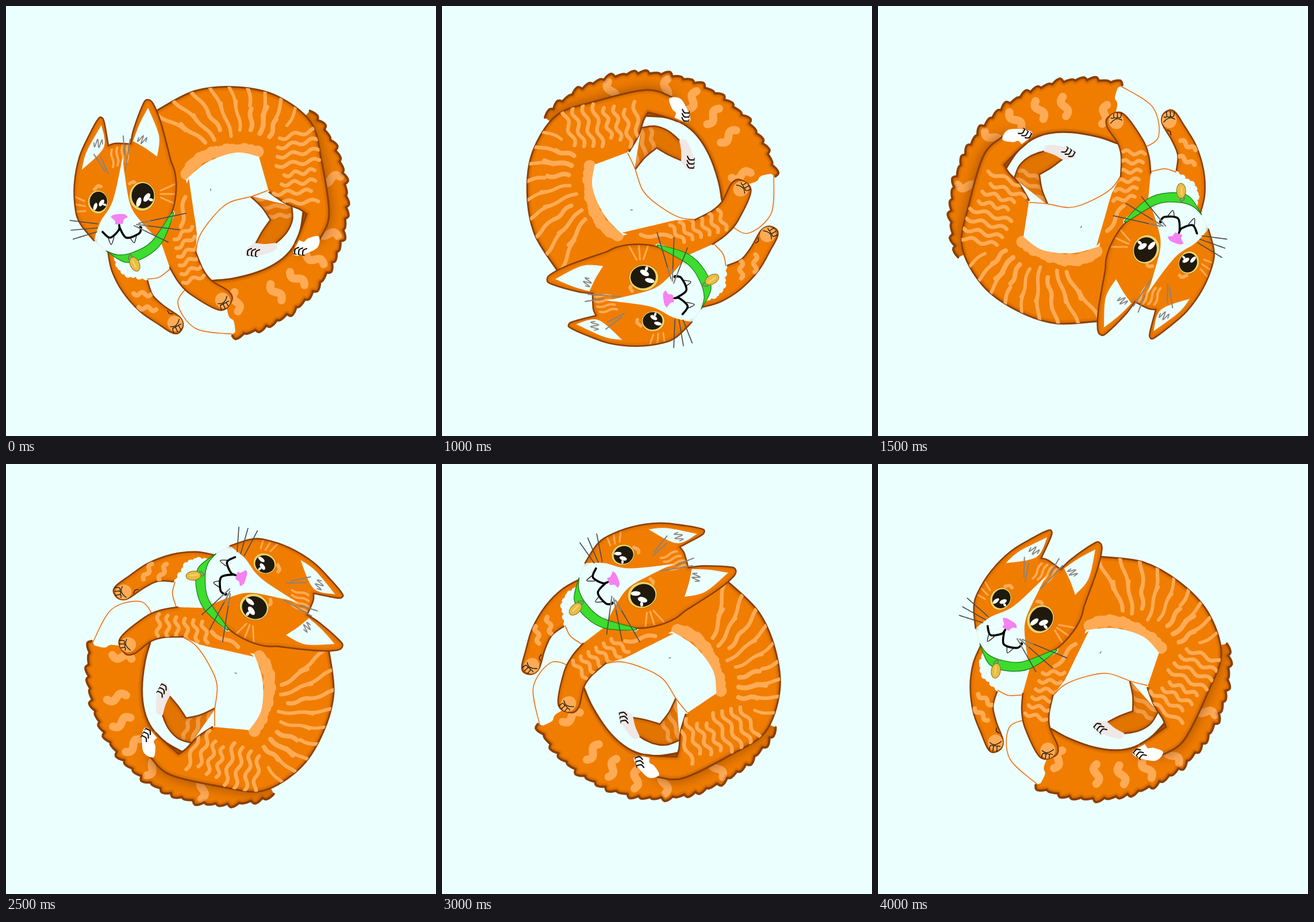
Write an HTML page with a canvas that moves like this. It is 748 px wide and 748 px high and loops after 4500 ms.

```html
<!DOCTYPE html>
<html lang="en">
<head>
<meta charset="utf-8">
<title>Rolling cat</title>
<style>
html, body { margin: 0; width: 100%; height: 100%; overflow: hidden; background: #ebffff; }
canvas { display: block; }
</style>
</head>
<body>
<canvas id="stage" width="748" height="748"></canvas>
<script>
const ctx = document.getElementById('stage').getContext('2d');
const STEP = 500, RAD = Math.PI / 180;
// Counter-clockwise turn in degrees and the place of the pivot for each step
const POSES = [
  [0, 363, 354], [43, 367, 348], [94.7, 363.6, 345],
  [155.4, 361.4, 350], [209.3, 356.4, 358.9], [249, 365, 358],
  [288.2, 365.8, 354.7], [307, 370, 355.5], [325.5, 373.4, 360.2]
];
const BG = '#ebffff', ORANGE = '#f07d00', BROWN = '#8c3f05', LIGHT = '#ffab56';
const INK = '#15120c', WHISKER = '#4d4d4d', GREY = '#85827f', LINE = '#ef7416';

let seed;
function random() {
  seed = (seed * 16807) % 2147483647;
  return seed / 2147483647;
}
const jitter = size => (random() - 0.5) * 2 * size;

// Smooth curve through the points; "|" makes a corner
function curve(path, text, join) {
  let last = null;
  for (const run of text.split('|')) {
    const n = run.trim().split(/\s+/).map(Number);
    const p = last ? [last] : [];
    for (let i = 0; i < n.length; i += 2) p.push([n[i], n[i + 1]]);
    if (!last) join ? path.lineTo(...p[0]) : path.moveTo(...p[0]);
    for (let i = 0; i < p.length - 1; i++) {
      const a = p[i - 1] || p[i], b = p[i], c = p[i + 1], d = p[i + 2] || c;
      path.bezierCurveTo(
        b[0] + (c[0] - a[0]) / 6, b[1] + (c[1] - a[1]) / 6,
        c[0] - (d[0] - b[0]) / 6, c[1] - (d[1] - b[1]) / 6, c[0], c[1]);
    }
    last = p[p.length - 1];
  }
  return path;
}

function lines(text) {
  const path = new Path2D();
  text.split(';').forEach(t => curve(path, t));
  return path;
}

const shape = text => {
  const path = lines(text);
  path.closePath();
  return path;
};

function fill(path, color) {
  ctx.fillStyle = color;
  ctx.fill(path);
}

function stroke(path, color, width) {
  ctx.strokeStyle = color;
  ctx.lineWidth = width;
  ctx.stroke(path);
}

function inside(path, draw) {
  ctx.save();
  ctx.clip(path);
  draw();
  ctx.restore();
}

function oval(x, y, rx, ry, color, turn = 0) {
  ctx.beginPath();
  ctx.ellipse(x, y, rx, ry, turn, 0, 7);
  ctx.fillStyle = color;
  ctx.fill();
}

// Wavy stroke between two points
function wave(x0, y0, x1, y1, color, width, amp = 3, turns = 1.5) {
  const path = new Path2D(), len = Math.hypot(x1 - x0, y1 - y0);
  const nx = (y0 - y1) / len, ny = (x1 - x0) / len;
  for (let t = 0; t <= 1.001; t += 1 / 16) {
    const s = amp * Math.sin(t * turns * 2 * Math.PI);
    path.lineTo(x0 + (x1 - x0) * t + nx * s, y0 + (y1 - y0) * t + ny * s);
  }
  stroke(path, color, width);
}

// Straight stroke by start, length and angle in degrees
function ray(x, y, len, deg, color, width) {
  wave(x, y, x + len * Math.cos(deg * RAD), y + len * Math.sin(deg * RAD), color, width, 0);
}

// Brown edge that fades softly into the coat
function edge(area, line, width = 2.6, glow = 0.07) {
  inside(area, () => {
    ctx.globalAlpha = glow;
    for (const w of [13, 9, 6]) stroke(line, BROWN, w);
  });
  stroke(line, BROWN, width);
}

// Row of round tufts along an arc bent towards a control point
function fringe([x0, y0], [cx, cy], [x1, y1], count, r, color) {
  for (let i = 0; i <= count; i++) {
    const t = i / count, u = 1 - t;
    oval(u * u * x0 + 2 * u * t * cx + t * t * x1,
      u * u * y0 + 2 * u * t * cy + t * t * y1 + 1.5 * Math.sin(i * 2.1), r, r, color);
  }
}

// Tufted rim of the tail: an arc with leaning teeth, wider at both ends
function tailRim() {
  const path = new Path2D(), count = 25, from = -0.82, to = 1.484;
  for (let i = 0; i <= count * 8; i++) {
    const u = i / 8, k = Math.floor(u), f = u - k, e = 2 * u / count - 1;
    const tooth = f < 0.75 ? Math.sin(f / 0.75 * Math.PI / 2) : Math.cos((f - 0.75) * 2 * Math.PI);
    const r = 216.5 + 10 * e * e + (4.5 + 2.5 * Math.sin(k * 2.4)) * tooth;
    const a = from + (to - from) * u / count;
    path.lineTo(374 + r * Math.cos(a), 348 + r * Math.sin(a));
  }
  return path;
}

const tailInner = '357 478 395 474 440 462 475 444 498 421 512 390 518 350';
const rim = tailRim();
const tail = curve(new Path2D(rim), '399 566 396 548 387 538 380 500|' + tailInner + '|520 192', true);
const tipLine = '396 571 330 561 299 518 318 486';
const tailTip = shape(tipLine + '|384 498|396 548 396 571');

const back = '262 182 328 148 400 141 470 156 530 202 549 270 562 362 546 405';
const hip = '503 412 512 392 523 362|510 353 484 342 458 324';
const bellyLine = '455 321 428 331 388 342 360 367 336 402 330 434';
const body = shape(back + '|502 428|' + hip + '|' + bellyLine + '|270 300 262 182');
const belly = shape('313 302 350 272 400 255 440 262|457 322|' + bellyLine + '|330 380 313 302');

const farOuter = '424 330 445 350 460 372|446 392 434 414', farInner = '470 412 488 394 498 372 497 348';
const farLeg = shape(farOuter + '|' + farInner + '|424 330');
const farFoot = shape('432 412 450 414 470 412|469 424 440 434 417 431 420 421 432 412');
const nearFoot = shape('510 407 518 410 526 404 544 401 541 421 510 434 500 429 510 407');

const armLine = '330 428 343 459 358 478 387 496 393 512 372 529 322 502 300 480 285 455';
const arm = shape('318 300 332 395|' + armLine + '|270 412|290 370 318 300');
const leftLine = '177 425 184 460 203 497 233 531 266 554 288 568 300 569 308 556 302 541 275 522 255 503 246 477';
const leftArm = shape(leftLine + '|230 430 177 425');
const chest = shape('184 428 194 446 226 470 246 476|266 472 285 458|268 408|184 428');

const headLine = '153 408 130 380 121 355 119 310 128 262 146 222 160 197 166 194 171 203 178 243' +
  '|190 239 217 240|222 215 238 172 246 163 256 170 270 205 287 270|294 290 296 320 290 355 272 392 258 406';
const head = shape(headLine + '|240 424 210 433 180 428 153 408');
const face = shape('153 408 164 376 186 338 203 262|206 290 216 345 234 374 260 402|240 424 210 433 180 428 153 408');
const ears = ['166 207 170 246 132 285|140 254 166 207', '247 177 266 225 263 262|242 247 221 235|232 206 247 177'].map(shape);
const collar = shape('174 426 195 433 222 428 254 409 287 361|291 363 271 412 242 437 208 446 174 426');

function drawTail() {
  fill(tailTip, BG);
  stroke(lines(tipLine), LINE, 1.6);
  fill(tail, ORANGE);
  inside(tail, () => {
    for (const deg of [80, 56, 42, 28, 13, -15]) {
      const r = 200 - 0.45 * Math.max(0, deg), c = Math.cos(deg * RAD), s = Math.sin(deg * RAD);
      wave(372 + c * (r - 17), 353 + s * (r - 17), 372 + c * (r + 17), 353 + s * (r + 17), LIGHT, 14, 5, 1);
    }
  });
  edge(tail, rim, 4, 0.14);
  edge(tail, lines(tailInner), 3, 0.14);
  inside(tail, () => {
    ctx.shadowColor = 'rgba(110,45,0,.7)';
    ctx.shadowBlur = 24;
    fill(body, ORANGE);
  });
}

function drawToes(x, y) {
  ctx.save();
  ctx.translate(x, y);
  for (let i = 0; i < 3; i++) {
    stroke(lines('0 8 1 1 7 -2'), INK, 2.2);
    stroke(lines('-1 9 3 10'), INK, 1.3);
    ctx.translate(7, 1);
  }
  ctx.restore();
}

function drawFarLeg() {
  fill(farLeg, '#e27400');
  inside(farLeg, () => {
    for (let i = 0; i < 3; i++) wave(430 + 14 * i, 336 + 15 * i, 494, 330 + 17 * i, '#f09a45', 7, 2);
  });
  edge(farLeg, lines(farOuter + ';' + farInner));
  fill(farFoot, '#f0e8e6');
  drawToes(420, 424);
}

// Two rows of stripes fan out over the back, waves run down the hip
function drawCoat() {
  seed = 11;
  for (let i = 0; i < 17; i++) {
    const a = (-140 + 5.6 * i + jitter(1)) * RAD, outer = i % 2 === 0;
    const r0 = outer ? 180 : 130 + jitter(6), r1 = outer ? 122 + jitter(8) : 84 + jitter(10);
    wave(400 + r0 * Math.cos(a), 300 + r0 * Math.sin(a),
      400 + r1 * Math.cos(a + 0.08), 300 + r1 * Math.sin(a + 0.08), LIGHT, 7 + jitter(1.5), 2, 1);
  }
  for (let i = 0; i < 8; i++) {
    const y = 222 + 16 * i;
    wave(472 + jitter(12), y + 8, 538 + jitter(8), y - 8 + 2 * i, LIGHT, 6.5, 3.5, 2);
  }
}

function drawBody() {
  fill(body, ORANGE);
  edge(body, lines(back + ';' + hip), 3, 0.1);
  inside(body, drawCoat);
  fringe([314, 292], [340, 240], [438, 252], 16, 10.5, LIGHT);
  fill(belly, BG);
  stroke(lines(bellyLine), LINE, 1.7);
  ray(356, 318, 3, 90, '#555', 1.2);
  fill(nearFoot, '#fff');
  drawToes(502, 422);
}

function drawFrontPaw(x, y) {
  ctx.save();
  ctx.translate(x, y);
  ctx.rotate(-0.5);
  oval(0, -2, 13, 14, LIGHT);
  for (let i = -1; i <= 1; i++) stroke(lines(`${7 * i - 3} 13 ${6 * i - 2} 4 ${6 * i + 3} 4`), INK, 1.3);
  stroke(lines('-10 -1 -3 2 4 0 10 -5'), INK, 1.3);
  ctx.restore();
}

function drawArms() {
  fill(leftArm, ORANGE);
  edge(leftArm, lines(leftLine));
  inside(leftArm, () => {
    for (let i = 0; i < 2; i++) wave(222 + 9 * i, 500 + 24 * i, 252 + 9 * i, 502 + 26 * i, LIGHT, 8);
    drawFrontPaw(295, 554);
  });
  stroke(lines('281 530 284 535 290 535'), INK, 1.3);
  fill(chest, BG);
  fringe([194, 440], [198, 472], [244, 470], 7, 6, BG);
  stroke(lines('246 475 266 472 285 458'), LINE, 1.7);
  fill(arm, ORANGE);
  edge(arm, lines(armLine));
  inside(arm, () => {
    wave(312, 332, 304, 384, LIGHT, 7, 3, 1);
    for (let i = 0; i < 6; i++) wave(293 + 3 * i, 406 + 15 * i, 324 + 4 * i, 384 + 17 * i, LIGHT, 6.5);
    drawFrontPaw(378, 514);
  });
}

function drawEye(x, y, size) {
  ctx.save();
  ctx.translate(x, y);
  ctx.scale(size, size);
  oval(0, 0, 23, 26, '#8d5a0a');
  oval(0, 0, 22.5, 25.5, '#f3cf62');
  oval(1, -1, 19.5, 22, '#1f1a0d');
  oval(-6, 10, 4, 8.5, '#fff', 0.3);
  oval(8, 2, 4.5, 8.5, '#fff', 0.6);
  oval(15, 6, 4, 2.6, '#fff', 0.3);
  ctx.restore();
}

function drawHead() {
  fill(head, ORANGE);
  inside(head, () => {
    for (let i = 0; i < 4; i++) wave(184 + 9.5 * i, 250 - 4 * i, 186 + 8 * i, 280 - 3 * i, LIGHT, 4, 1.5, 1);
    for (let i = -1; i <= 1; i++) {
      ray(269, 327 + 6 * i, 27, 24 * i, LIGHT, 3);
      ray(120, 345 + 13 * i, 18, 10 - 14 * i, LIGHT, 3);
    }
    stroke(lines('215 309 222 306 229 313;154 319 160 313 165 314'), LIGHT, 6);
  });
  fill(face, BG);
  edge(head, lines(headLine));
  ears.forEach(e => fill(e, BG));
  wave(153, 238, 168, 240, GREY, 1.8, 7, 2);
  wave(231, 229, 243, 236, GREY, 1.8, 7, 2);
  ray(153, 258, 35, 57, GREY, 2);
  ray(165, 262, 33, 67, GREY, 2);
  ray(204, 226, 32, 86, GREY, 2);
  ray(216, 232, 56, 99, GREY, 2);
  drawEye(160, 341, 0.78);
  drawEye(237, 331, 1);
  fill(shape('182 367 188 363 205 362 212 367|205 371|203 379|190 380|190 374|182 367'), '#f582f0');
  stroke(lines('177 401 183 415 188 402;216 403 223 412 227 399'), INK, 1.3);
  stroke(lines('168 393 181 403 196 390 197 381;197 384 209 403 231 396 235 386'), '#000', 3.6);
  oval(234, 385, 2.5, 2.5, '#000');
}

function drawCollar() {
  fill(collar, '#3ddc2e');
  stroke(collar, '#17791a', 1.2);
  stroke(lines('215 432 219 434 218 441 213 440 215 432'), '#77776a', 1.8);
  oval(224, 449, 8.5, 13.5, '#8b6b1c', -0.45);
  oval(224, 449, 7.5, 12.5, '#e9bd44', -0.45);
  ray(220, 443, 13, 63, '#f5d777', 2.2);
}

function drawWhiskers() {
  for (let i = 0; i < 3; i++) {
    ray(160 - i, 379 + 7 * i, 49 - 3 * i, 187 - 12 * i, WHISKER, 1.7);
    ray(231 - 4 * i, 378 + 2 * i, 84 - 9 * i, -12 + 19 * i, WHISKER, 1.7);
    ray(231 - 4 * i, 378 + 2 * i, 20, -12 + 19 * i, GREY, 2);
  }
}

function drawCat([deg, x, y]) {
  ctx.fillStyle = BG;
  ctx.fillRect(0, 0, 748, 748);
  ctx.save();
  ctx.lineCap = ctx.lineJoin = 'round';
  ctx.translate(x, y);
  ctx.rotate(-deg * RAD);
  ctx.translate(-POSES[0][1], -POSES[0][2]);
  drawTail();
  drawFarLeg();
  drawBody();
  drawArms();
  drawHead();
  drawCollar();
  drawWhiskers();
  ctx.restore();
}

let shown = -1;
function tick() {
  const step = Math.floor(performance.now() / STEP) % POSES.length;
  if (step !== shown) {
    shown = step;
    drawCat(POSES[step]);
  }
  requestAnimationFrame(tick);
}
tick();
</script>
</body>
</html>
```
